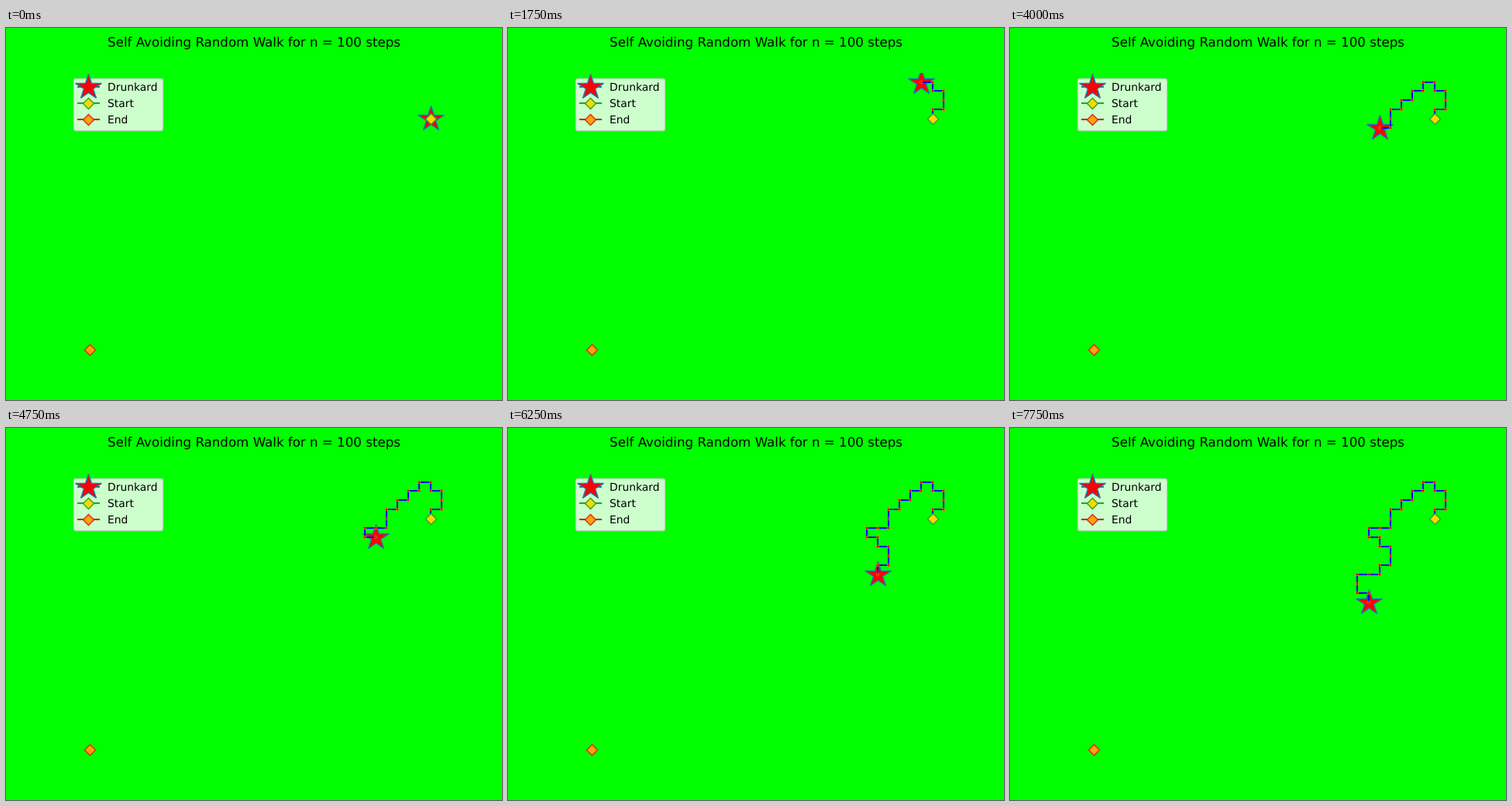
An HTML page for the animation above (8000 ms loop, 640x480 px).

```html
<!DOCTYPE html>
<html lang="en">
<head>
<meta charset="utf-8">
<title>Self Avoiding Random Walk</title>
<style>
  html, body { margin: 0; width: 100%; height: 100%; overflow: hidden; background: #0f0; }
  svg { display: block; }
  text { font: 13.89px "DejaVu Sans", sans-serif; text-rendering: geometricPrecision; }
  .title { font-size: 16.67px; text-anchor: middle; }
  .mark { stroke-width: 1.39; }
  .key { stroke-width: 2.08; }
</style>
</head>
<body>
<svg width="640" height="480" viewBox="0 0 640 480">
  <defs>
    <clipPath id="axes"><rect x="80" y="58" width="497" height="370"/></clipPath>
    <path id="star" class="mark" fill="#f00" stroke="#1f77b4" stroke-linejoin="bevel"/>
    <path id="diamond" class="mark" d="M.5-6.5L7.5 .5L.5 7.5L-6.5 .5Z"/>
  </defs>
  <text class="title" x="320" y="24">Self Avoiding Random Walk for n = 100 steps</text>
  <g clip-path="url(#axes)">
    <use id="walker" href="#star"/>
    <path id="trail" fill="none" stroke="#00f" stroke-width="2.08" stroke-linecap="square" stroke-linejoin="round"/>
    <g id="dots" fill="#d80000" stroke="#ff7f0e" stroke-width=".7"></g>
    <use href="#diamond" x="548" y="117" fill="#ffd700" stroke="#2ca02c"/>
    <use href="#diamond" x="108" y="415" fill="#ffa500" stroke="#d62728"/>
  </g>
  <rect x="87.5" y="65.5" width="115" height="67" rx="2.8" fill="#fff" fill-opacity=".8"
        stroke="#ccc" stroke-opacity=".8" stroke-width="1.39"/>
  <g class="key">
    <path d="M92 76H121" stroke="#1f77b4"/>
    <path d="M92 97H121" stroke="#2ca02c"/>
    <path d="M92 118H121" stroke="#d62728"/>
  </g>
  <use href="#star" x="106" y="76"/>
  <use href="#diamond" x="106" y="97" fill="#ffd700" stroke="#2ca02c"/>
  <use href="#diamond" x="106" y="118" fill="#ffa500" stroke="#d62728"/>
  <text x="131" y="81">Drunkard</text>
  <text x="131" y="102">Start</text>
  <text x="131" y="123">End</text>
</svg>
<script>
const STEP = 250;
const MOVES = "URUULULDLDLDLDDLLDRDRDDLDLLDDRD";
const DIRS = { U: [0, -1], D: [0, 1], L: [-1, 0], R: [1, 0] };
const CELL_W = 496 / 35, CELL_H = 369.6 / 31;
const $ = id => document.getElementById(id);
const toPath = pts => "M" + pts.map(p => p.join(" ")).join("L");

// Star corners sit on pixel centres.
const snap = v => Math.floor(v + 0.5) + 0.5;
const corners = Array.from({ length: 10 }, (_, i) => {
  const r = i % 2 ? 6.63 : 17.36, a = i * Math.PI / 5;
  return [snap(r * Math.sin(a)), snap(-r * Math.cos(a))];
});
$("star").setAttribute("d", toPath(corners) + "Z");

// Walk over grid cells, then round to pixels.
let col = 33, row = 5;
const cells = [[col, row]];
for (const m of MOVES) {
  col += DIRS[m][0];
  row += DIRS[m][1];
  cells.push([col, row]);
}
const points = cells.map(([c, r]) => [
  Math.round(80 + c * CELL_W),
  Math.round(57.6 + r * CELL_H)
]);

const dots = points.map(([x, y]) => {
  const dot = document.createElementNS("http://www.w3.org/2000/svg", "circle");
  dot.setAttribute("cx", x);
  dot.setAttribute("cy", y);
  dot.setAttribute("r", 1.75);
  $("dots").append(dot);
  return dot;
});

let shown = -1;
function draw() {
  const n = Math.floor(performance.now() / STEP) % points.length;
  if (n !== shown) {
    $("walker").setAttribute("transform", `translate(${points[n]})`);
    $("trail").setAttribute("d", n ? toPath(points.slice(0, n + 1)) : "");
    dots.forEach((dot, i) => dot.setAttribute("visibility", i <= n ? "visible" : "hidden"));
    shown = n;
  }
  requestAnimationFrame(draw);
}
draw();
</script>
</body>
</html>
```
